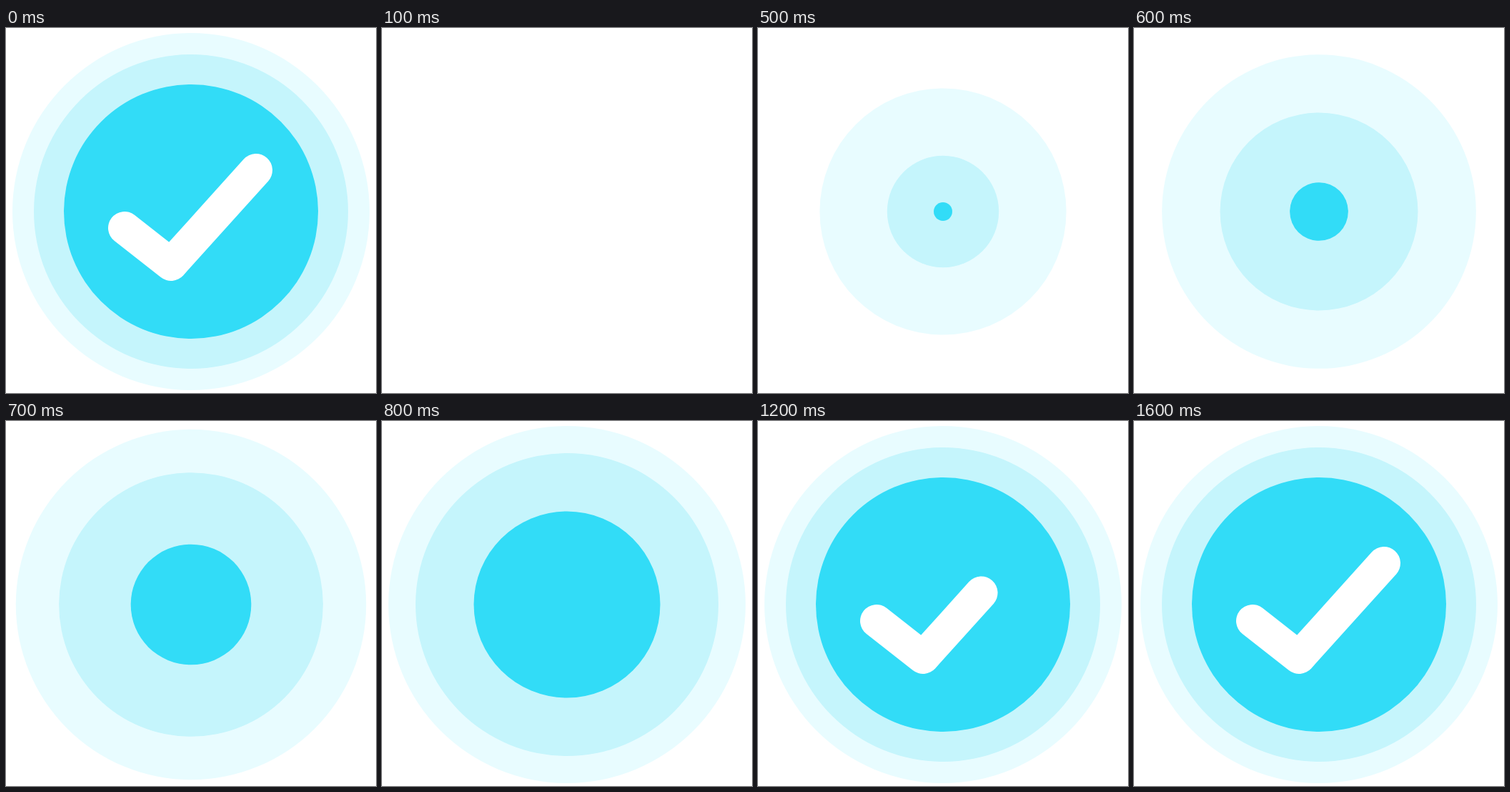
An HTML page for the animation above (2.3 s loop, 518 by 511 pixels).

```html
<!DOCTYPE html>
<html lang="en">
<head>
<meta charset="utf-8">
<title>Check mark</title>
<style>
  html, body { margin: 0; width: 100%; height: 100%; overflow: hidden; background: #fff; }
  svg { display: block; width: 100%; height: 100%; }
  #check { fill: none; stroke: #fff; stroke-width: 46; stroke-linecap: round; stroke-linejoin: round; }
</style>
</head>
<body>
<svg viewBox="0 0 518 511">
  <g id="rings" transform="translate(259 257)">
    <circle r="250" fill="#e8fcff"/>
    <circle r="220" fill="#c5f5fc"/>
    <circle r="178" fill="#32dcf7"/>
  </g>
  <path id="check" pathLength="1" d="M166 280 L231 331 L350 199"/>
</svg>
<script>
  const LOOP = 2300, STEP = 100;
  const GROW = 676, DRAW = 668, DRAW_START = 932;
  const starts = [90, 215, 371];

  const rings = [...document.querySelectorAll('#rings circle')].map((el, i) => (
    { el, start: starts[i], radius: +el.getAttribute('r') }
  ));
  const check = document.getElementById('check');

  const progress = (t, start, length) => Math.min(1, Math.max(0, (t - start) / length));
  const easeInOut = u => u < 0.5 ? 2 * u * u : 1 - 2 * (1 - u) ** 2;
  const easeOut = u => 1 - (1 - u) ** 3;

  function render(now) {
    // The first step of each loop holds the finished mark.
    const t = Math.floor(now % LOOP / STEP) * STEP || LOOP;
    for (const { el, start, radius } of rings) {
      el.setAttribute('r', radius * easeInOut(progress(t, start, GROW)));
    }
    const drawn = easeOut(progress(t, DRAW_START, DRAW));
    check.style.visibility = drawn > 0 ? 'visible' : 'hidden';
    check.style.strokeDasharray = drawn < 1 ? `${drawn} 2` : 'none';
  }

  const origin = performance.now();
  function tick() {
    render(performance.now() - origin);
    requestAnimationFrame(tick);
  }
  tick();
</script>
</body>
</html>
```
